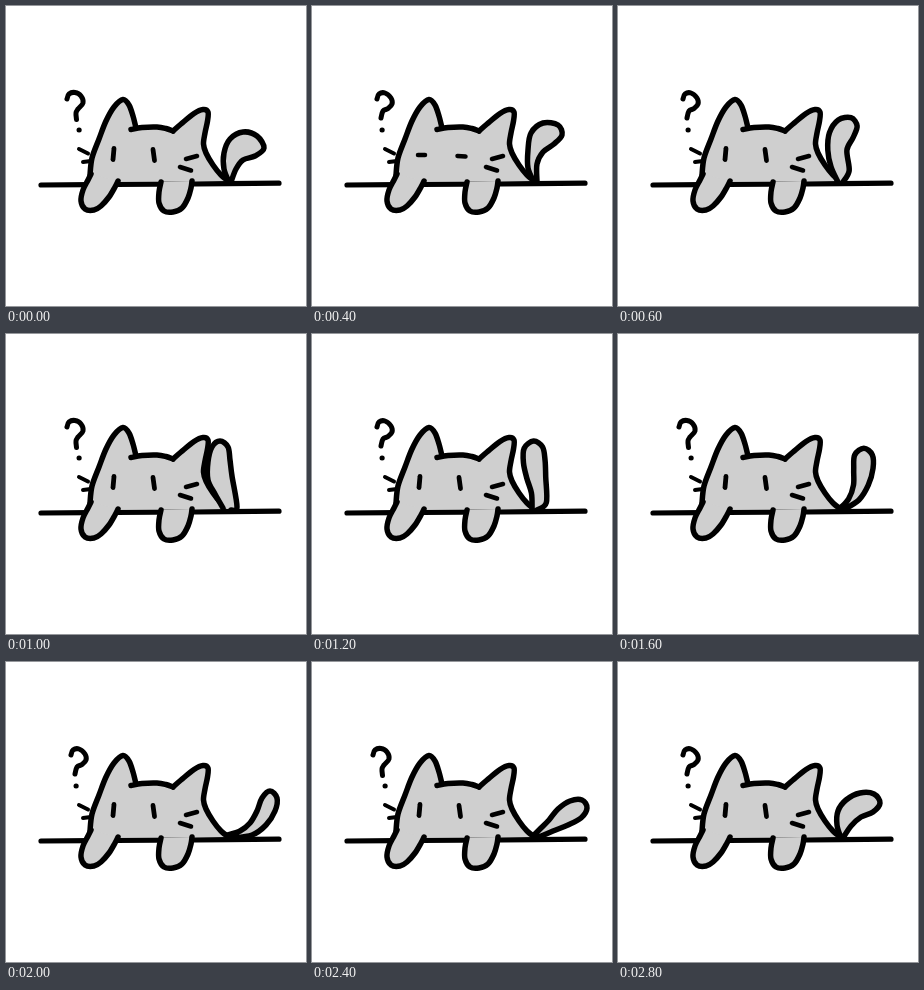
Write an HTML page with a canvas that moves like this. It is 300 px wide and 300 px high and loops after 3000 ms.

```html
<!DOCTYPE html>
<html>
<head>
<meta charset="utf-8">
<style>
html, body { margin: 0; width: 100%; height: 100%; overflow: hidden; background: #fff; }
canvas { display: block; width: 300px; height: 300px; }
</style>
</head>
<body>
<canvas id="stage" width="300" height="300"></canvas>
<script>
const ctx = document.getElementById('stage').getContext('2d');
const STEP = 200, COUNT = 15;
const GREY = '#cfcfcf';
const ROOT = [225, 176];

// Tail outlines, from the left of the root round the tip to the right
const tails = {
  curl: [223,176, 218,163, 218,147, 224,133, 237,126, 251,130, 258,142, 249,150, 237,154, 230,163],
  hook: [222,176, 216,162, 216,144, 219,127, 231,117, 246,119, 250,129, 242,138, 231,146, 225,158],
  back: [217,174, 209,160, 202,146, 202,128, 206,113, 214,107, 222,113, 224,126, 226,142, 231,173],
  up: [223,175, 227,163, 226,147, 220,131, 218,116, 229,108, 239,114, 242,128, 241,146, 236,163],
  lean: [221,173, 234,169, 244,161, 251,149, 256,136, 264,129, 271,136, 269,149, 260,163, 246,173],
  low: [221,174, 229,166, 237,158, 246,147, 258,139, 270,138, 275,146, 269,156, 256,163, 241,169],
  rise: [223,176, 219,163, 220,149, 228,138, 242,131, 256,132, 262,141, 255,150, 243,155, 233,164]
};

// One swing: pose, next pose, share of the next
const swing = [
  ['curl'], ['curl', 'hook', 0.4], ['hook'], ['hook', 'back', 0.45], ['hook', 'back', 0.75],
  ['back'], ['back', 'up', 0.5], ['up'], ['up', 'lean', 0.42], ['up', 'lean', 0.75],
  ['lean'], ['lean', 'low', 0.55], ['low'], ['low', 'rise', 0.5], ['rise']
];

function pairs(list) {
  const out = [];
  for (let i = 0; i < list.length; i += 2) out.push([list[i], list[i + 1]]);
  return out;
}

// Swing a point round the root rather than along a straight line
function turn(p, q, t) {
  const polar = ([x, y]) => [Math.hypot(x - ROOT[0], y - ROOT[1]), Math.atan2(y - ROOT[1], x - ROOT[0])];
  const [r0, a0] = polar(p), [r1, a1] = polar(q);
  let d = a1 - a0;
  if (d > Math.PI) d -= 2 * Math.PI;
  if (d < -Math.PI) d += 2 * Math.PI;
  const r = r0 + (r1 - r0) * t, a = a0 + d * t;
  return [ROOT[0] + r * Math.cos(a), ROOT[1] + r * Math.sin(a)];
}

// Smooth curve through all points
function curve(pts) {
  const at = i => pts[Math.max(0, Math.min(pts.length - 1, i))];
  ctx.beginPath();
  ctx.moveTo(...pts[0]);
  for (let i = 0; i < pts.length - 1; i++) {
    const [a, b, c, d] = [at(i - 1), at(i), at(i + 1), at(i + 2)];
    ctx.bezierCurveTo(
      b[0] + (c[0] - a[0]) / 6, b[1] + (c[1] - a[1]) / 6,
      c[0] - (d[0] - b[0]) / 6, c[1] - (d[1] - b[1]) / 6, c[0], c[1]);
  }
}

function ink(list, width = 5.5, fill) {
  curve(pairs(list));
  if (fill) { ctx.fillStyle = fill; ctx.fill(); }
  ctx.lineWidth = width;
  ctx.stroke();
}

function drawTail(step) {
  const [from, to, t] = swing[step];
  let pts = pairs(tails[from]);
  if (to) {
    const next = pairs(tails[to]);
    pts = pts.map((p, i) => turn(p, next[i], t));
  }
  ink([...pts, ROOT].flat(), 5.5, GREY);
}

const leftSide = [84,169, 86,152, 93,133, 100,115, 108,101, 117,93.5, 123,99, 127,110, 130,122];
const crown = [125,123.5, 136,121.5, 151,121, 160,122.5, 167,125];
const rightSide = [167,125, 175,118, 188,107.5, 197,103.5, 202,106, 201.5,115, 199,127, 197.5,138, 200,147, 207,159, 215,169, 224,176];

function drawBody() {
  ctx.fillStyle = GREY;
  curve(pairs([...leftSide, ...crown.slice(2), ...rightSide.slice(2)]));
  ctx.lineTo(84, 178);
  ctx.fill();
  for (const part of [leftSide, crown, rightSide]) ink(part);
}

function drawPaws() {
  ink([85,168, 82,174, 77,184, 75,195, 79,203, 88,204, 95,200, 103,191, 109,181, 112,175], 5.5, GREY);
  ink([155,176, 153,186, 153,197, 158,205, 167,206, 176,202, 182,192, 185,182, 186,175], 5.5, GREY);
}

function drawFace(shut) {
  if (shut) {
    ink([106,149, 113,149], 4.5);
    ink([145.5,150, 153.5,150.5], 4.5);
  } else {
    ink([108,142.5, 107,153.5], 4.8);
    ink([147,143.5, 148.5,154.5], 4.8);
  }
  ink([180,153, 191,150], 4.6);
  ink([174,161, 185,164.5], 4.6);
  ink([73,143, 82,147.5], 4);
  ink([77,156, 85,155], 4);
}

function drawQuestion(tilted) {
  if (tilted) {
    ink([65,93, 67,88, 73,87, 79,92, 80,98, 76,102.5, 71,105, 69,112], 5);
    ink([70,124, 70.2,124], 5);
  } else {
    ink([61,93, 63,88, 69,86.5, 75,90, 77,97, 72,103, 70,107, 70.5,113.5], 5);
    ink([73,124, 73.2,124], 5);
  }
}

function draw(step) {
  ctx.fillStyle = '#fff';
  ctx.fillRect(0, 0, 300, 300);
  ctx.strokeStyle = '#000';
  ctx.lineCap = ctx.lineJoin = 'round';
  drawBody();
  drawTail(step);
  ink([35,179, 110,178.5, 190,178, 273,177.2], 5.2);
  drawPaws();
  drawFace(step === 2 || step === 4);
  drawQuestion(Math.floor(step / 2) % 2 === 1);
}

const start = performance.now();
function tick(now) {
  draw(Math.floor(Math.max(0, now - start) / STEP) % COUNT);
  requestAnimationFrame(tick);
}
draw(0);
requestAnimationFrame(tick);
</script>
</body>
</html>
```
